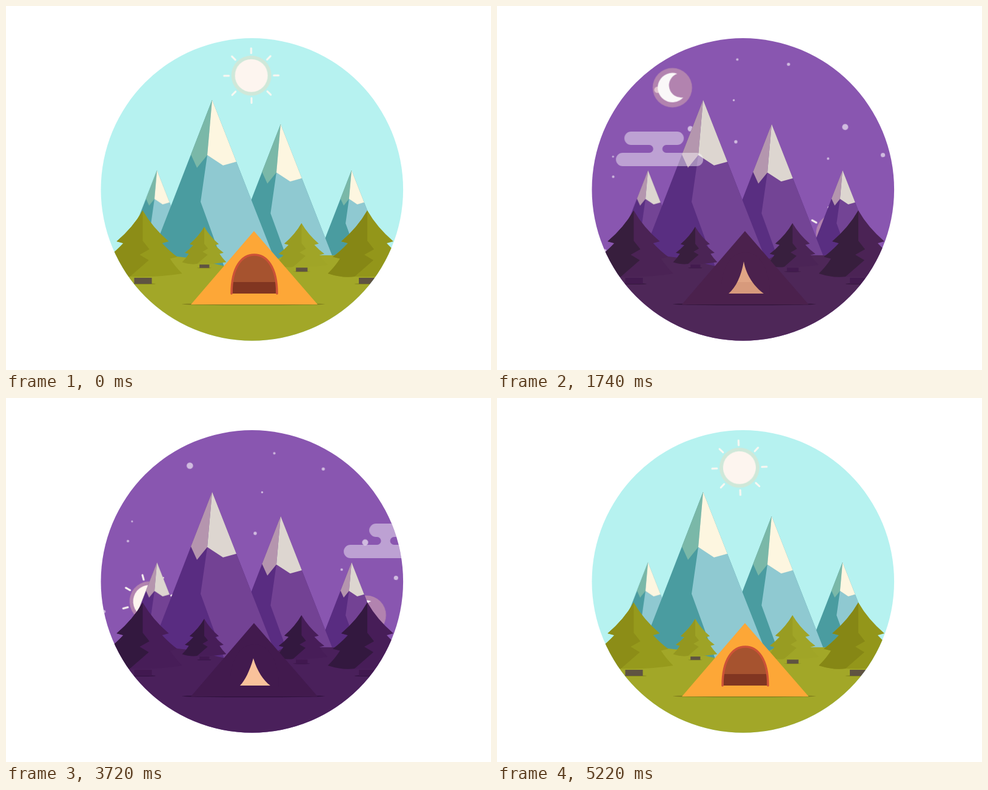
These frames come from a looping animation (800x600 px, 5.25 s). An HTML page:

```html
<!DOCTYPE html>
<html lang="en">
<head>
<meta charset="utf-8">
<title>Camp, day and night</title>
<style>
html, body { margin: 0; width: 100%; height: 100%; overflow: hidden; background: #fff; }
svg { display: block; width: 800px; height: 600px; }

/* --d is the day colour, --n the night colour */
.sky, .hill, .land { fill: var(--d); animation: 5250ms linear infinite; }
.sky { animation-name: sky; }
.hill { animation-name: hill; }
.land { animation-name: land; }
.rim { fill: none; stroke: #cc5237; stroke-width: 3.5; stroke-linecap: round; animation: rim 5250ms linear infinite; }
.room { fill: #a6532f; animation: glow 5250ms linear infinite; }
.floor { fill: #6a2418; animation: floor 5250ms linear infinite; }
.flap { animation: land 5250ms linear infinite, flap 5250ms linear infinite; }
.sun { transform-origin: 406px 290px; animation: turn 5250ms linear infinite; }
.moon { animation: moon 5250ms linear infinite; }
.stars { transform-origin: 406px 302px; animation: drift 5250ms linear infinite, stars 5250ms linear infinite; }
.cloud { animation: cloud 5250ms linear infinite; }
.puff { animation: puff 5250ms linear infinite; }

@keyframes sky {
  0%, 24.6% { fill: var(--d); }
  32.57%, 70.9% { fill: var(--n); }
  78.3%, 100% { fill: var(--d); }
}
@keyframes hill {
  0%, 21.7% { fill: var(--d); }
  33.33%, 70.9% { fill: var(--n); }
  79.4%, 100% { fill: var(--d); }
}
@keyframes land {
  0%, 23% { fill: var(--d); }
  33.7%, 71% { fill: var(--n); }
  78.7%, 100% { fill: var(--d); }
}
@keyframes rim {
  0%, 20.5% { stroke: #cc5237; }
  32.5%, 71% { stroke: #421a4e; }
  78.7%, 100% { stroke: #cc5237; }
}
@keyframes glow {
  0%, 21.5% { fill: #a6532f; }
  25.14% { fill: #b8694b; }
  33.14% { fill: #e0a585; }
  37.14%, 71% { fill: #f9c29b; }
  78.3%, 100% { fill: #a6532f; }
}
@keyframes floor {
  0%, 21.5% { opacity: .6; }
  33.14% { opacity: .08; }
  37.14%, 71% { opacity: 0; }
  78.3%, 100% { opacity: .6; }
}
/* the door outline, then the opening cut out of it */
@keyframes flap {
  0%, 20% { d: path("M369 477C369 428 388 406 409.5 406C431 406 450 428 450 477ZM369 477C369 428 388 406 409.5 406C431 406 450 428 450 477Z"); }
  25.14% { d: path("M369 477C369 428 388 406 409.5 406C431 406 450 428 450 477ZM369 477C369 428 388 406 409.5 406C428 406 446 438 450 477Z"); }
  33.14% { d: path("M369 477C369 428 388 406 409.5 406C431 406 450 428 450 477ZM382 474C394 464 403 445 407 421C411 445 426 464 440 474Z"); }
  37.14%, 71.2% { d: path("M369 477C369 428 388 406 409.5 406C431 406 450 428 450 477ZM386 474C394 466 402 450 408 429C414 450 425 466 436 474Z"); }
  78%, 100% { d: path("M369 477C369 428 388 406 409.5 406C431 406 450 428 450 477ZM369 477C369 428 388 406 409.5 406C431 406 450 428 450 477Z"); }
}
@keyframes turn {
  from { transform: rotate(-.5deg); }
  to { transform: rotate(360deg); }
}
@keyframes moon {
  0% { transform: rotate(-163deg) translateY(-190px) rotate(163deg); }
  25.14% { transform: rotate(-66.1deg) translateY(-190px) rotate(66.1deg); }
  33.14% { transform: rotate(-36.3deg) translateY(-195px) rotate(36.3deg); }
  42.86% { transform: rotate(1.2deg) translateY(-188.5px) rotate(-1.2deg); }
  53.71% { transform: rotate(43.3deg) translateY(-190px) rotate(-43.3deg); }
  70.86% { transform: rotate(109.1deg) translateY(-201px) rotate(-109.1deg); }
  100% { transform: rotate(221deg) translateY(-200px) rotate(-221deg); }
}
@keyframes drift {
  from { transform: rotate(-17.5deg); }
  to { transform: rotate(15.4deg); }
}
@keyframes stars {
  0%, 25.5% { opacity: 0; }
  32.57%, 70.9% { opacity: .6; }
  80%, 100% { opacity: 0; }
}
@keyframes cloud {
  0% { transform: translateX(16px); }
  10.29% { transform: translateX(40px); }
  17.71% { transform: translateX(75px); }
  25.14% { transform: translateX(126px); }
  33.14% { transform: translateX(196px); }
  43.43% { transform: translateX(297px); }
  53.71% { transform: translateX(402px); }
  62.29% { transform: translateX(484px); }
  70.86% { transform: translateX(557px); }
  78.86% { transform: translateX(611px); }
  87.62% { transform: translateX(649px); }
  95.24%, 100% { transform: translateX(662px); }
}
@keyframes puff {
  from { transform: translateX(-11px); }
  to { transform: translateX(64px); }
}
</style>
</head>
<body>
<svg viewBox="0 0 800 600">
  <clipPath id="disc"><circle cx="405.8" cy="302.4" r="249.3"/></clipPath>
  <g clip-path="url(#disc)">
    <circle class="sky" cx="406" cy="302.5" r="251" style="--d:#b6f2f0;--n:#8956b0"/>
    <g class="stars" id="stars" fill="#fff"></g>
    <g class="sun">
      <circle cx="406" cy="114.7" r="33" fill="rgba(255,215,175,.35)"/>
      <circle cx="406" cy="114.7" r="27" fill="#fdf5ef"/>
      <g id="rays" stroke="#fdf8f2" stroke-width="3" stroke-linecap="round"></g>
    </g>
    <g transform="translate(404.5 292)">
      <g class="moon">
        <circle r="32.5" fill="rgba(255,215,175,.35)"/>
        <path d="M8-23A24.2 24.2 0 1 0 18 16A20.2 20.2 0 0 1 8-23Z" fill="#faf8f8"/>
      </g>
    </g>
    <g id="hills"></g>
    <path class="land" d="M150 404Q240 407 300 415L366 430 446 418 462 410 540 411 660 405V560H150Z" style="--d:#a2a728;--n:#4a205b"/>
    <g id="trees"></g>
    <g style="--d:#fda737;--n:#421a4e">
      <ellipse class="land" cx="408" cy="491.5" rx="118" ry="1.8" style="--d:#7f7c1c;--n:#2e103c"/>
      <path class="land" d="M409 371L514 492H305Z"/>
      <path class="room" d="M372 474C372 430 389 410 409.5 410C430 410 447 430 447 474Z"/>
      <rect class="floor" x="374" y="455" width="71" height="19"/>
      <path class="rim" d="M372 474C372 430 389 410 409.5 410C430 410 447 430 447 474"/>
      <path class="land flap" fill-rule="evenodd" d="M369 477C369 428 388 406 409.5 406C431 406 450 428 450 477ZM369 477C369 428 388 406 409.5 406C431 406 450 428 450 477Z"/>
    </g>
    <g class="cloud" fill="#fff" opacity=".45">
      <rect class="puff" y="207" width="98" height="22" rx="11"/>
      <path d="M55 229h28a6.5 6.5 0 0 0 0 13h-28a6.5 6.5 0 0 0 0-13z"/>
      <rect y="242" width="144" height="22" rx="11"/>
    </g>
  </g>
</svg>
<script>
const fill = (id, html) => document.getElementById(id).innerHTML = html.join('');
const tint = (day, night) => `style="--d:${day};--n:${night}"`;

// x, y, radius
const stars = [
  [421, 88.5, 2], [504, 106, 2.6], [407.5, 154.5, 1.7], [403, 223, 2.7],
  [585, 219.5, 5], [641.5, 272.5, 3.6], [551, 268, 2], [284.5, 123, 5.3],
  [331, 193, 4.5], [199, 224, 1.6], [195.5, 257, 2.1], [168, 376.5, 2.5]
];
fill('stars', stars.map(([x, y, r]) => `<circle cx="${x}" cy="${y}" r="${r}"/>`));

fill('rays', [...Array(8).keys()].map(i =>
  `<path d="M406 77.7V69.7" transform="rotate(${i * 45} 406 114.7)"/>`));

const mountain = (x, y, s) => `<g transform="translate(${x} ${y}) scale(${s})">
  <path class="hill" ${tint('#4a9ca0', '#592c81')} d="M0 0L-108 278H109Z"/>
  <path class="hill" ${tint('#8fc9d1', '#734294')} d="M-8 91L-19 168 21 278H109L40 102 18 107Z"/>
  <path class="hill" ${tint('#7ab8a8', '#b595ae')} d="M0 0L-35 90-25 112-8 91Z"/>
  <path class="hill" ${tint('#fdf6e0', '#ddd6d0')} d="M0 0L-8 91 18 108 40 102Z"/></g>`;
fill('hills', [
  mountain(249, 270.8, .52), mountain(570, 270.8, .52),
  mountain(453, 194.8, .875), mountain(340, 154.8, 1)
]);

const left = 'M0 0Q-16 28-43 51L-32 54Q-44 67-57 76.5L-45 79.5Q-53 92-65 104Q-40 112-21 109';
const tree = (x, y, s, dark, light) => `<g transform="translate(${x} ${y}) scale(${s})">
  <ellipse class="land" ${tint('#86891d', '#31123f')} cy="121" rx="21" ry="1"/>
  <rect class="land" ${tint('#5f5341', '#411850')} x="-14" y="111" width="29" height="10"/>
  <path class="land" ${tint(light, '#471d58')} d="${left}Q22 111 65 104Q53 92 45 79.5L57 76.5Q44 67 32 54L43 51Q16 28 0 0Z"/>
  <path class="land" ${tint(dark, '#33183f')} d="${left}L10 82-5 73 11 64 0 50Z"/></g>`;
fill('trees', [
  tree(327, 364, .56, '#94971f', '#9ea326'), tree(487.5, 358, .66, '#989c22', '#a0a527'),
  tree(225.5, 337, 1, '#8c8d17', '#969a1c'), tree(596, 337, 1, '#868715', '#93961a')
]);
</script>
</body>
</html>
```
